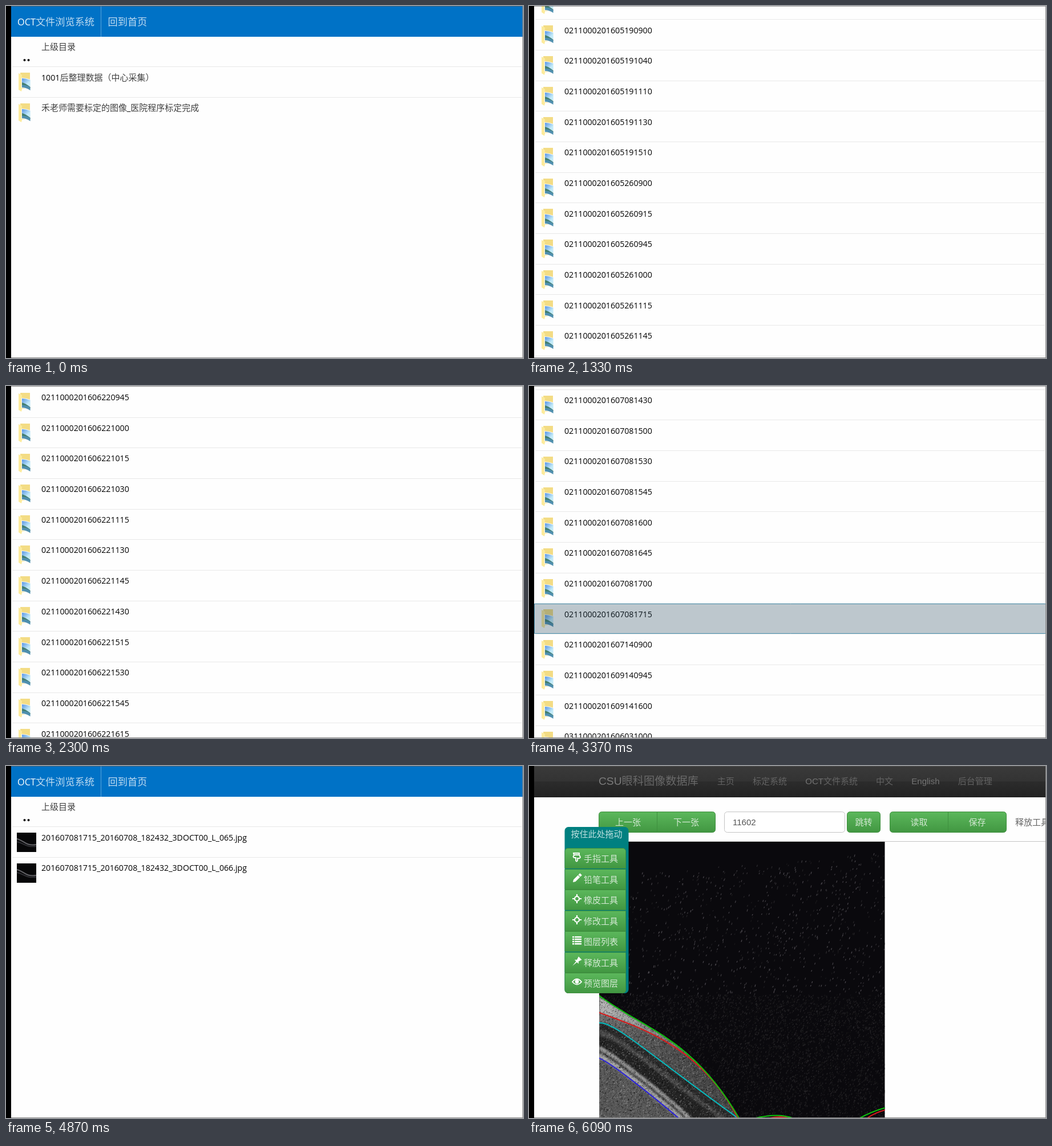
Animation of 906x618 px, one loop 8 s. Source, as an HTML page with a canvas:

```html
<!DOCTYPE html>
<html lang="zh">
<head>
<meta charset="utf-8">
<title>OCT文件浏览系统</title>
<style>
  html, body { margin: 0; overflow: hidden; background: #fff; }
  canvas { display: block; }
</style>
</head>
<body>
<canvas id="stage" width="906" height="618"></canvas>
<script>
const W = 906, H = 618, LOOP = 8000;
const ROW = 53.67, FIRST = 106.3;
const stage = document.getElementById("stage").getContext("2d");
let c = stage;

function rect(x, y, w, h, fill) {
  c.fillStyle = fill;
  c.fillRect(x, y, w, h);
}

function shape(path, fill) {
  c.fillStyle = fill;
  c.fill(new Path2D(path));
}

function dot(x, y, r, fill) {
  c.beginPath();
  c.arc(x, y, r, 0, 7);
  c.fillStyle = fill;
  c.fill();
}

function roundBox(x, y, w, h, radii, fill, border) {
  c.beginPath();
  c.roundRect(x + .5, y + .5, w - 1, h - 1, radii);
  c.fillStyle = fill;
  c.fill();
  c.strokeStyle = border;
  c.lineWidth = 1;
  c.stroke();
}

function gradient(x, y, w, h, ...colors) {
  const g = c.createLinearGradient(x, y, x + w, y + h);
  colors.forEach((color, i) => g.addColorStop(i / (colors.length - 1), color));
  return g;
}

// Chinese and Latin runs use their own face; Chinese is drawn lighter. Returns the end x.
function text(s, x, y, size, color, face = "Open Sans", scale = .945) {
  c.fillStyle = color;
  for (const run of s.match(/[\u3000-\uffef]+|[^\u3000-\uffef]+/g)) {
    const chinese = run.charCodeAt(0) >= 0x3000;
    c.font = chinese
      ? `300 ${size}px "Noto Sans CJK SC", "Noto Sans CJK", sans-serif`
      : `${size * scale}px "${face}", "Noto Sans", sans-serif`;
    c.globalAlpha = chinese ? .75 : 1;
    c.fillText(run, x, y);
    x += c.measureText(run).width;
  }
  c.globalAlpha = 1;
  return x;
}
const arial = (s, x, y, size, color) => text(s, x, y, size, color, "Liberation Sans", 1);

// ---------- file browser ----------
const on = (day, times) => times.split(" ").map(time => "02110002016" + day + time);
const folders = [
  ...on("0519", "0845 0900 1040 1110 1130 1510"),
  ...on("0526", "0900 0915 0945 1000 1115 1145"),
  ...Array.from({ length: 28 }, (_, i) => on(`06${10 + (i >> 2)}`, `${10 + i % 4}30`)[0]),
  ...on("0622", "0945 1000 1015 1030 1115 1130 1145 1430 1515 1530 1545 1615"),
  ...on("0708", "1430 1500 1530 1545 1600 1645 1700 1715"),
  ...on("0714", "0900"),
  ...on("0914", "0945 1600"),
  "0311000201606031000"
];
const home = ["1001后整理数据（中心采集）", "禾老师需要标定的图像_医院程序标定完成"];
const files = ["065", "066"].map(n => `201607081715_20160708_182432_3DOCT00_L_${n}.jpg`);

// A flick that slows down, redrawn every 135 ms.
function scrollAt(t) {
  if (t < 1330) return 0;
  const p = Math.min(10, Math.floor((t - 1330) / 135)) / 10;
  return 136.57 + 51.33 * ROW * (p + .3237 * p * (1 - p));
}

function folderIcon(y) {
  c.save();
  c.translate(22, y + 11);
  shape("M3 0H20V28H5Z", "#f3dc84");
  shape("M0 1L6 4V29L5 33L0 30Z", "#fdeb9c");
  shape("M5 9Q13 9 21 12V32Q13 27 5 27Z", "#f4f8fa");
  shape("M6 10Q13 10 20.5 13V24L6 20Z", gradient(6, 10, 10, 10, "#5794e6", "#c4ebf8"));
  shape("M6 17Q11 18 20.5 25V27L6 23Z", "#437f70");
  shape("M6 22Q14 21 20.5 26V31Q13 26 6 26Z", "#4f8fae");
  c.restore();
}

function thumbnail(y) {
  rect(19, y + 11, 34, 34, "#070708");
  c.strokeStyle = "#626266";
  c.lineWidth = 2;
  c.stroke(new Path2D(`M19 ${y + 22}c12 2 15 13 34 10`));
  c.strokeStyle = "#2e2e32";
  c.stroke(new Path2D(`M19 ${y + 27}c12 2 15 10 34 8`));
}

function browser(names, { scroll = 0, selected = -1, icon = folderIcon } = {}) {
  const top = Math.round(-scroll);
  rect(9, top, W, 54, "#0072c6");
  rect(166, top, 1, 54, "#5ba4da");
  text("OCT文件浏览系统", 20, top + 34, 17.2, "#fff");
  text("回到首页", 178.5, top + 34, 17.2, "#fff");
  text("上级目录", 62, top + 77, 15, "#000");
  dot(32.5, top + 95, 2, "#000");
  dot(39.5, top + 95, 2, "#000");
  names.forEach((name, i) => {
    const exact = FIRST + i * ROW - scroll, y = Math.round(exact);
    if (y < -60 || y > H) return;
    rect(11, y, 893, 1, "#e8e8e8");
    icon(y);
    text(name, 62, Math.round(exact + 24.3), 15, "#000");
    if (i === selected) roundBox(9, y + 1, W, 53, 0, "rgba(38,70,90,.3)", "#4a90ad");
  });
}

// ---------- image editor ----------
const green = "M123 403C200 462 285 475 368 618";
const red = "M123 433C190 458 300 490 366 618";
const cyan = "M123 451C150 448 220 514 366 618";
const blue = "M123 513C145 522 215 578 262 618";

function curve(path, color) {
  c.strokeStyle = color;
  c.lineWidth = 2;
  c.stroke(new Path2D(path));
}

function fillBelow(path, dy, color) {
  c.save();
  c.translate(0, dy);
  shape(path + "L330 680H123Z", color);
  c.restore();
}

function makeScan() {
  const layer = document.createElement("canvas");
  layer.width = W;
  layer.height = H;
  c = layer.getContext("2d");
  let seed = 7;
  const random = () => (seed = (seed * 16807) % 2147483647) / 2147483647;
  const speckle = (count, y0, y1, size, color) => {
    for (let i = 0; i < count; i++) {
      const x = 123 + random() * 500, y = y0 + random() * (y1 - y0), h = size * (1 + random());
      if (y > 195 - (x - 123) * .08) shape(`M${x} ${y}h1.2l1-${h}h-1.2Z`, color());
    }
  };
  const grey = (low, range) => () => `hsl(270 4% ${low + random() * range}%)`;
  c.beginPath();
  c.rect(123, 133, 500.5, 485);
  c.clip();
  rect(123, 133, 501, 485, "#0a090d");
  speckle(1100, 150, 403, 2, grey(10, 22));
  speckle(7000, 403, 620, 1.5, grey(6, 11));

  // Tissue layers, each painted over the one above, then grained.
  c.save();
  c.clip(new Path2D(green + "H123Z"));
  c.filter = "blur(1.5px)";
  fillBelow(green, 0, gradient(123, 0, 230, 0, "#b4b4b4", "#808080", "#444"));
  fillBelow(red, 0, gradient(123, 0, 230, 0, "#6c6c6c", "#505050", "#444"));
  fillBelow(cyan, 0, "#2c2c2c");
  fillBelow(cyan, 14, "#4a4a4a");
  fillBelow(cyan, 24, "#242424");
  fillBelow(blue, -22, "#949494");
  fillBelow(blue, -14, "#444");
  fillBelow(blue, -9, "#a0a0a0");
  fillBelow(blue, 1, gradient(0, 515, -40, 50, "#585858", "#262626"));
  c.filter = "none";
  speckle(26000, 403, 620, 1, () => random() < .6
    ? `rgba(0,0,0,${random() * .6})` : `rgba(225,225,225,${random() * .4})`);
  c.restore();

  curve(blue, "#2a22d8");
  curve(cyan, "#00c0c4");
  curve(red + "M422 618q18-4 34 0M590 620q15-11 34-16", "#d81c1c");
  curve(green + "M393 619q45-11 71 0M580 618q20-11 44-18", "#0cc40c");
  c = stage;
  return layer;
}
const scan = makeScan();

function button(x, y, w, h, radii, label, labelX = x + (w - 15 * label.length) / 2) {
  roundBox(x, y, w, h, radii, gradient(0, y, 0, h, "#5cb85c", "#419641"), "#3e8f3e");
  text(label, labelX, y + h / 2 + 5.5, 15, "#fff");
}

function target() {
  curveWhite("M-4 0a4 4 0 1 1 8 0a4 4 0 1 1-8 0M-8 0h5m6 0h5M0-8v5m0 6v5", 2.2);
}

function curveWhite(path, width = 1.8) {
  c.strokeStyle = "#fff";
  c.lineWidth = width;
  c.stroke(new Path2D(path));
}

const tools = {
  手指工具: () => curveWhite("M-6-7H4V-4L6 0Q5 3 1 2V6Q-1 9-2 6V1H-5Q-8-1-5-3ZM-5-4H3"),
  铅笔工具: () => {
    c.rotate(-Math.PI / 4);
    shape("M-10 0L-6-2.5H5V2.5H-6ZM6-2.5h4v5h-4Z", "#fff");
  },
  橡皮工具: target,
  修改工具: target,
  图层列表: () => {
    for (let y = -7; y < 7; y += 4) {
      rect(-8, y, 3, 2.5, "#fff");
      rect(-4, y, 12, 2.5, "#fff");
    }
  },
  释放工具: () => {
    c.rotate(Math.PI / 4);
    shape("M-4-8H4L2-2L5 1H1L0 11L-1 1H-5L-2-2Z", "#fff");
  },
  预览图层: () => {
    curveWhite("M-8 0Q0-10 8 0Q0 9-8 0Z");
    dot(0, -.5, 3.4, "#fff");
  }
};

function editor(loaded) {
  rect(9, 0, W, 27, gradient(0, 0, 0, 27, "#3a3a3a", "#333"));
  rect(9, 27, W, 28, gradient(0, 27, 0, 28, "#2c2c2c", "#222"));
  let x = arial("CSU眼科图像数据库", 122, 33, 19.2, "#7c7c7c") + 33;
  for (const label of ["主页", "标定系统", "OCT文件系统", "中文", "English", "后台管理"]) {
    x = arial(label, x, 32, 15, "#747474") + 32.2;
  }

  rect(122, 132, W, 1, "#c4c4c4");
  const left = [5, 0, 0, 5], right = [0, 5, 5, 0];
  button(122, 80, 103, 37, left, "上一张");
  button(224, 80, 103, 37, right, "下一张");
  roundBox(342, 80, 212, 37, 5, "#fff", "#c4c4c4");
  arial("11602", 357, 104, 15, "#555");
  button(557, 80, 59, 37, 5, "跳转");
  button(632, 80, 103, 37, left, "读取");
  button(734, 80, 103, 37, right, "保存");
  text("释放工具", 852, 104, 15, "#333");

  if (loaded) c.drawImage(scan, 0, 0);

  roundBox(62.5, 107, 112, 292, 6, "#008080", "#008080");
  text("按住此处拖动", 73.5, 125, 15, "#fff");
  Object.entries(tools).forEach(([label, icon], i) => {
    const y = Math.round(144 + i * 36.5);
    const radii = i === 0 ? [5, 5, 0, 0] : i === 6 ? [0, 0, 5, 5] : 0;
    button(62.5, y, 107.5, 36, radii, label, 96);
    c.save();
    c.translate(84, y + 16);
    icon();
    c.restore();
  });
}

// ---------- timeline: each scene with its end time ----------
const scenes = [
  [680, () => browser(home)],
  [800, () => browser(home, { selected: 0 })],
  [3510, t => browser(folders, { scroll: scrollAt(t), selected: t < 3370 ? -1 : 59 })],
  [4190, () => browser(["提取黄斑图像"])],
  [4320, () => browser(["提取黄斑图像"], { selected: 0 })],
  [4720, () => browser(["L", "R"])],
  [4870, () => browser(["L", "R"], { selected: 0 })],
  [5700, () => browser(files, { icon: thumbnail })],
  [5970, () => {}],
  [6090, () => editor(false)],
  [LOOP, () => editor(true)]
];

function draw(now) {
  const t = now % LOOP;
  rect(0, 0, W, H, "#fefefe");
  scenes.find(([end]) => t < end)[1](t);
  rect(0, 0, 9, H, "#000");
  rect(9, 0, W, 1, "rgba(90,90,90,.6)");
  rect(905, 0, 1, H, "#8a8a8a");
  rect(9, 617, W, 1, "#8a8a8a");
  requestAnimationFrame(draw);
}
requestAnimationFrame(draw);
</script>
</body>
</html>
```
